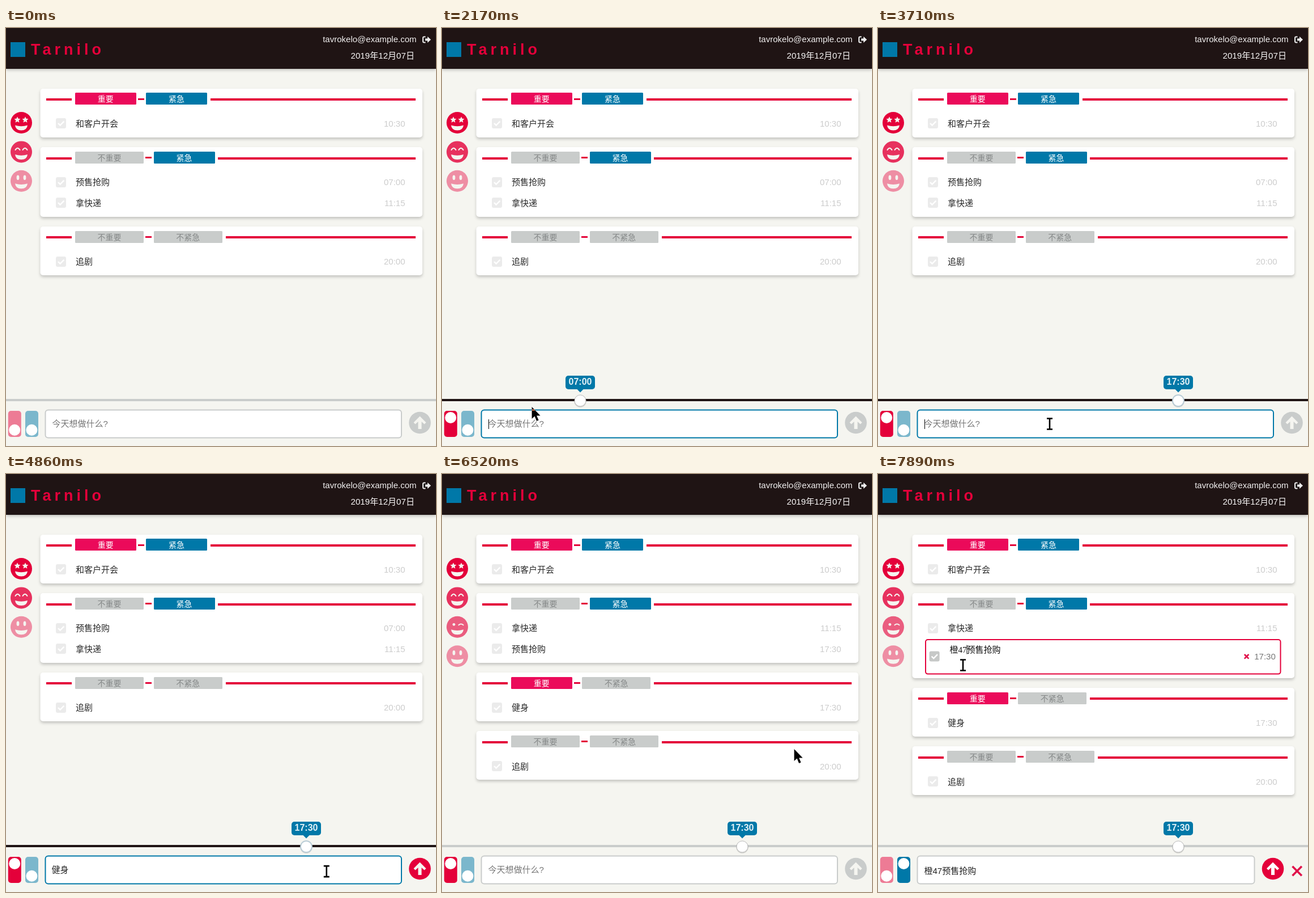
An HTML page for the animation above (8 s loop, 759x737 px).

```html
<!DOCTYPE html>
<html lang="zh-CN">
<head>
<meta charset="utf-8">
<title>To-do list</title>
<style>
html, body { margin: 0; width: 100%; height: 100%; overflow: hidden; background: #f5f5f0; }
svg { display: block; width: 759px; height: 737px; font-family: "Liberation Sans", "Noto Sans CJK SC", "Noto Sans CJK", sans-serif; }
text { white-space: pre; }
.serif { font-family: "Liberation Serif", "Noto Sans CJK SC", "Noto Sans CJK", serif; }
.card { filter: drop-shadow(0 3px 2.5px rgba(0, 0, 0, .2)); }
.bar { filter: drop-shadow(0 1px 3px rgba(0, 0, 0, .3)); }
.cursor { mix-blend-mode: difference; }
</style>
</head>
<body>
<svg id="stage" viewBox="0 0 759 737"></svg>
<script>
const stage = document.getElementById('stage');
const LOOP = 8000;
const BG = '#f5f5f0', RED = '#e4003a', PINK = '#eb0a5a', BLUE = '#0078a8', GREY = '#c9cccb', DARK = '#1f1414';
const FOCUS = 1110, DRAG = 2400, REFOCUS = 3330, COMPOSE = 4060, WORD = 4310;
const SEND = 5240, BLUR = 6150, EDIT = 6870, CLICK = 7480, TYPE = 7760;

// time, x, y, shape
const PATH = [
  [510, 230, 493, 'arrow'], [800, 90, 640, 'arrow'], [960, 18, 698, 'hand'],
  [1320, 18, 698, 'hand'], [1480, 40, 690, 'hand'], [1840, 40, 690, 'hand'],
  [1960, 72, 684, 'arrow'], [2170, 158, 668, 'arrow'], [2340, 254, 659, 'hand'],
  [2400, 254, 659, 'hand'], [2640, 441, 659, 'hand'], [2850, 505, 659, 'hand'],
  [3130, 540, 659, 'hand'], [3300, 540, 659, 'arrow'], [3420, 490, 675, 'beam'],
  [3700, 303, 698, 'beam'], [4670, 303, 698, 'beam'], [4960, 702, 702, 'arrow'],
  [4990, 718, 702, 'hand'], [5040, 736, 699, 'hand'], [5750, 736, 699, 'hand'],
  [5830, 728, 670, 'arrow'], [6320, 620, 518, 'arrow'], [6490, 620, 518, 'arrow'],
  [6720, 632, 274, 'arrow'], [6840, 630, 309, 'beam'], [6990, 630, 309, 'beam'],
  [7290, 165, 358, 'beam'], [7320, 160, 356, 'beam'], [7440, 127, 304, 'beam'],
  [7490, 127, 304, 'beam'], [7580, 150, 337, 'beam']
];
const SHAPES = {
  arrow: '<path d="M0 0V21L5 16.5L8.5 25L12 23.5L8.5 15.5H15Z" fill="#fff"/>',
  hand: '<path d="M-3 1Q0 -2 3 1V9L9 10.5Q13 11 13 15V20Q13 24 10 29H-2Q-4 25 -9 17Q-9 13 -6 14L-3 17Z" fill="#fff"/>',
  beam: '<path d="M-5 -9.5H5M-5 9.5H5M0 -9.5V9.5" fill="none" stroke="#fff" stroke-width="2.6"/>'
};

const clamp = v => Math.max(0, Math.min(1, v));
const ramp = (t, start, len) => clamp((t - start) / len);
const ease = p => 1 - (1 - p) * (1 - p) * (1 - p * .15);
const rgb = hex => [1, 3, 5].map(i => parseInt(hex.substr(i, 2), 16));
function mix(a, b, p) {
  const A = rgb(a), B = rgb(b);
  return `rgb(${A.map((v, i) => Math.round(v + (B[i] - v) * p))})`;
}

const rect = (x, y, w, h, fill, r = 0, more = '') =>
  `<rect x="${x}" y="${y}" width="${w}" height="${h}" rx="${r}" fill="${fill}" ${more}/>`;
const circle = (x, y, r, fill, more = '') => `<circle cx="${x}" cy="${y}" r="${r}" fill="${fill}" ${more}/>`;
const text = (x, y, s, size, fill, more = '') =>
  `<text x="${x}" y="${Math.round(y)}" font-size="${size}" fill="${fill}" ${more}>${s}</text>`;
const line = (d, color, width, more = '') =>
  `<path d="${d}" fill="none" stroke="${color}" stroke-width="${width}" ${more}/>`;
const at = (x, y, body, more = '') => `<g transform="translate(${x} ${y})" ${more}>${body}</g>`;
const fadeIn = (opacity, body) => `<g opacity="${opacity}">${body}</g>`;
const cross = (x, y, r, w) => line(`M${x - r} ${y - r}l${2 * r} ${2 * r}m0 ${-2 * r}l${-2 * r} ${2 * r}`, '#e0104a', w);
const caret = (x, y, h) => rect(x, y, 1, h, '#000');
const END = 'text-anchor="end"', MID = 'text-anchor="middle"';

function pointer(t) {
  if (t < PATH[0][0]) return null;
  let i = PATH.length - 1;
  while (PATH[i][0] > t) i--;
  const a = PATH[i], b = PATH[i + 1] || a;
  const p = b === a ? 0 : (t - a[0]) / (b[0] - a[0]);
  return { x: a[1] + (b[1] - a[1]) * p, y: a[2] + (b[2] - a[2]) * p, shape: a[3] };
}

function header() {
  return rect(0, 0, 759, 72, DARK, 0, 'class="bar"') +
    rect(8, 25, 26, 26, BLUE) +
    text(44, 47, 'Tarnilo', 27, RED, 'font-weight="700" letter-spacing="6"') +
    text(724.5, 25, 'tavrokelo@example.com', 15, '#f2f0f0', END) +
    text(721, 54, '2019年12月07日', 15.1, '#f8f6f6', END) +
    line('M740.5 15.5H738Q736 15.5 736 17.5V23.5Q736 25.5 738 25.5H740.5', '#eee', 2) +
    '<path d="M740 18.5H744V15L750 20.5L744 26V22.5H740Z" fill="#eee"/>';
}

function star(x, y) {
  const pts = Array.from({ length: 10 }, (_, i) => {
    const a = i * Math.PI / 5 - Math.PI / 2, r = i % 2 ? 2.7 : 5.8;
    return [x + r * Math.cos(a), y + r * Math.sin(a)].map(v => v.toFixed(2)).join();
  });
  return `<polygon points="${pts.join(' ')}" fill="${BG}"/>`;
}
const arcEye = (x, rise) =>
  line(`M${x - 4} -3.5Q${x} ${-3.5 - rise} ${x + 4} -3.5`, BG, 2, 'stroke-linecap="round"');
const oval = x => `<ellipse cx="${x}" cy="-6" rx="2.4" ry="4.2" fill="${BG}"/>`;
const EYES = {
  star: star(-7, -5) + star(7, -5),
  smile: arcEye(-6.5, 6.5) + arcEye(6.5, 6.5),
  wink: circle(-6, -4.5, 2.4, BG) + arcEye(6.5, 3.5),
  grin: oval(-6) + oval(6)
};
function face(kind, y, opacity) {
  return at(27, y, circle(0, 0, 19, mix(BG, RED, opacity)) + EYES[kind] +
    `<path d="M-11 4.5Q0 8 11 4.5Q10 13.5 0 13.5Q-10 13.5 -11 4.5Z" fill="${BG}"/>`);
}

function check(x, y, on) {
  return rect(x - 9, y - 9, 18, 18, on ? '#c6c8c7' : '#ebebeb', 3) +
    line(`M${x - 5} ${y}l3.6 3.6l6.8 -7`, '#fff', 2.4);
}

function row(y, [label, time], cur) {
  const over = cur && Math.abs(cur.y - y) < 18 && cur.x > 83 && cur.x < 711;
  return check(97, Math.round(y), over) + text(123, y + 5.6, label, 15, '#2a2a2a') +
    (over ? cross(652, y, 3.8, 2.6) : '') +
    text(704.5, y + 5.6, time, 15, over ? '#777' : '#cccccc', END);
}

function editor(t, border, height, label) {
  const mid = 290.2 + height / 2, x = 124.3 + border * 1.1, y = 313.3 + border * .6;
  const shown = (t - (t < CLICK ? EDIT : CLICK)) % 1060 < 530;
  const cx = t < CLICK ? x + 61.5 : x + (t < TYPE ? 0 : 7.5 * (label.length - 3));
  return rect(83 + border / 2, 291 + border / 2, 628.5 - border, height - border, '#fff', border * 2,
      `stroke="${mix('#301018', RED, border / 2)}" stroke-width="${border}"`) +
    check(97.2 + border * 1.2, mid, true) +
    text(x, y, label, 15, '#111', 'class="serif"') +
    (shown ? caret(cx, y - 13, 16) : '') +
    cross(653 - border * 1.2, mid + .3, 3.8, 2.6) +
    text(704.6 - border * 1.4, mid + 5.6, '17:30', 15, '#777', END);
}

function tag(x, y, label, color) {
  const w = label.length === 2 ? 107.5 : 121;
  return {
    end: x + w,
    svg: rect(Math.round(x), y, Math.round(w), 21, color, 1.5) +
      text(x + w / 2, y + 15.5, label, 14, color === GREY ? '#858888' : '#fff', MID)
  };
}

function card(top, height, important, urgent) {
  const tagY = Math.round(top + 7.7), lineY = Math.round(top + 17.5), joinY = Math.round(top + 17);
  const a = tag(122, tagY, important ? '重要' : '不重要', important ? PINK : GREY);
  const b = tag(a.end + 17.8, tagY, urgent ? '紧急' : '不紧急', urgent ? BLUE : GREY);
  const start = Math.round(b.end + 6);
  return rect(60.5, Math.round(top), 674.5, Math.round(height), '#fff', 5, 'class="card"') + a.svg + b.svg +
    rect(71, lineY, 45, 4, RED) + rect(start, lineY, 723 - start, 4, RED) +
    rect(Math.round(a.end + 3), joinY, 11, 3, RED);
}

function lists(t, cur, title) {
  const sent = t >= SEND, editing = t >= EDIT;
  const border = 2 * ramp(t, EDIT, 300), grow = editing ? 23 + 2 * border : 0;
  const presale = ['预售抢购', sent ? '17:30' : '07:00'], parcel = ['拿快递', '11:15'];
  const groups = [
    { kind: 'star', alpha: 1, flags: [1, 1], rows: [['和客户开会', '10:30']] },
    { kind: 'smile', alpha: .8, flags: [0, 1], rows: sent ? [parcel, presale] : [presale, parcel] }
  ];
  if (sent) groups.push({ kind: 'wink', alpha: .62, flags: [1, 0], rows: [['健身', '17:30']], fade: ramp(t, SEND, 320) });
  groups.push({ kind: 'grin', alpha: .42, flags: [0, 0], rows: [['追剧', '20:00']] });

  let top = 106.7, out = '';
  groups.forEach((g, i) => {
    const height = 50 + 36.4 * g.rows.length + (i === 1 ? grow : 0);
    const rows = g.rows.map((r, j) => editing && r === presale
      ? editor(t, border, 35.6 + grow, title)
      : row(top + 61.7 + 36.4 * j, r, cur));
    out += fadeIn(g.fade ?? 1, face(g.kind, 167 + 51.4 * i, g.alpha) + card(top, height, ...g.flags) + rows.join(''));
    top += height + 17;
  });
  return out;
}

function toggle(x, color, slide, fade) {
  return rect(x, 675, 23, 46, mix(BG, color, .5 + fade / 2), 5) +
    circle(x + 11.4, 708.7 - 21.7 * slide, 10, '#fff');
}

function slider(t, cur) {
  const live = ramp(t, FOCUS, 240) - ramp(t, BLUR, 170);
  const track = rect(0, 654, 759, 4, mix(GREY, DARK, live));
  if (t < FOCUS) return track;
  let min = 420;
  if (t >= 3130) min = 1050;
  else if (t >= DRAG) min += Math.round((cur.x - 254) / 4.54) * 10;
  const x = Math.round(244.4 + .454 * (min - 420));
  const label = [Math.floor(min / 60), min % 60].map(v => String(v).padStart(2, '0')).join(':');
  const glow = ramp(t, DRAG, 150) - .45 * ramp(t, REFOCUS, 380) - .55 * ramp(t, SEND, 320);
  return track + fadeIn(ramp(t, FOCUS, 150),
    rect(x - 26, 613, 52, 24, BLUE, 5) +
    `<path d="M${x - 6} 636.5H${x + 6}L${x} 642.5Z" fill="${BLUE}"/>` +
    text(x, 629, label, 16, '#e2f0f6', MID + ' font-weight="700"') +
    circle(x, 658, 10.8, '#000', 'opacity=".14"') +
    circle(x, 657, 10, '#fff', `stroke="${mix('#bdbdbd', '#b5d9ea', glow)}" stroke-width="${1 + 1.6 * glow}"`));
}

function composer(t, cur, title) {
  const editing = t >= EDIT;
  const focus = ramp(t, FOCUS, 240) - ramp(t, DRAG, 230) + ramp(t, REFOCUS, 240) - ramp(t, BLUR, 170);
  let value = '';
  if (editing) value = title;
  else if (t >= WORD && t < SEND) value = '健身';
  else if (t >= COMPOSE && t < WORD) value = 'jianshen'.slice(0, 2 + 2 * Math.floor((t - COMPOSE) / 30));

  const on = ease(ramp(t, FOCUS, 250)), off = ease(ramp(t, EDIT, 250));
  const swap = ramp(t, EDIT, 400);
  let out = toggle(3.8, RED, on - off, ramp(t, FOCUS, 370) - swap) +
    toggle(34, BLUE, off, swap) +
    rect(69.5, 673.5, editing ? 595 : 628.5, 49, '#fff', 5, `stroke="${mix(GREY, BLUE, focus)}" stroke-width="2"`);
  out += value ? text(editing ? 81.5 : 80.5, editing ? 705 : 703, value, 15, '#222')
    : text(81.5, 703, '今天想做什么?', 15, '#777');

  const focused = (t >= FOCUS && t < DRAG) || (t >= REFOCUS && t < BLUR);
  const base = t < DRAG ? FOCUS : t < COMPOSE ? REFOCUS : t < SEND ? 3980 : SEND;
  if (focused && (t - base) % 1060 < 530) {
    const x = value === '健身' ? 110 : value ? 81 + value.length * 7.2 : 82;
    out += caret(x, 690, 17);
  }

  const over = !editing && cur && Math.hypot(cur.x - 731, cur.y - 696) < 20;
  const color = over ? '#d0002f' : value && (editing || t >= WORD) ? RED : GREY;
  out += at(editing ? 697 : 730.5, 696, circle(0, 0, 19.3, color) +
    `<path d="M0 -11.5L11 -.5L8 2.5L3 -2V11H-3V-2L-8 2.5L-11 -.5Z" fill="${editing || over ? '#fff' : BG}"/>`);
  if (editing) out += cross(739.7, 700, 8.2, 3.6);
  return out;
}

function draw(t) {
  const cur = pointer(t);
  const typed = t < TYPE ? 0 : t < 7830 ? 1 : t < 7890 ? 2 : 3;
  const title = '橙47'.slice(0, typed) + '预售抢购';
  stage.innerHTML = rect(0, 0, 759, 737, BG) + header() + lists(t, cur, title) +
    slider(t, cur) + composer(t, cur, title) +
    (cur ? at(cur.x, cur.y, SHAPES[cur.shape], 'class="cursor"') : '');
}

const start = performance.now();
function tick() {
  draw((performance.now() - start) % LOOP);
  requestAnimationFrame(tick);
}
tick();
</script>
</body>
</html>
```
